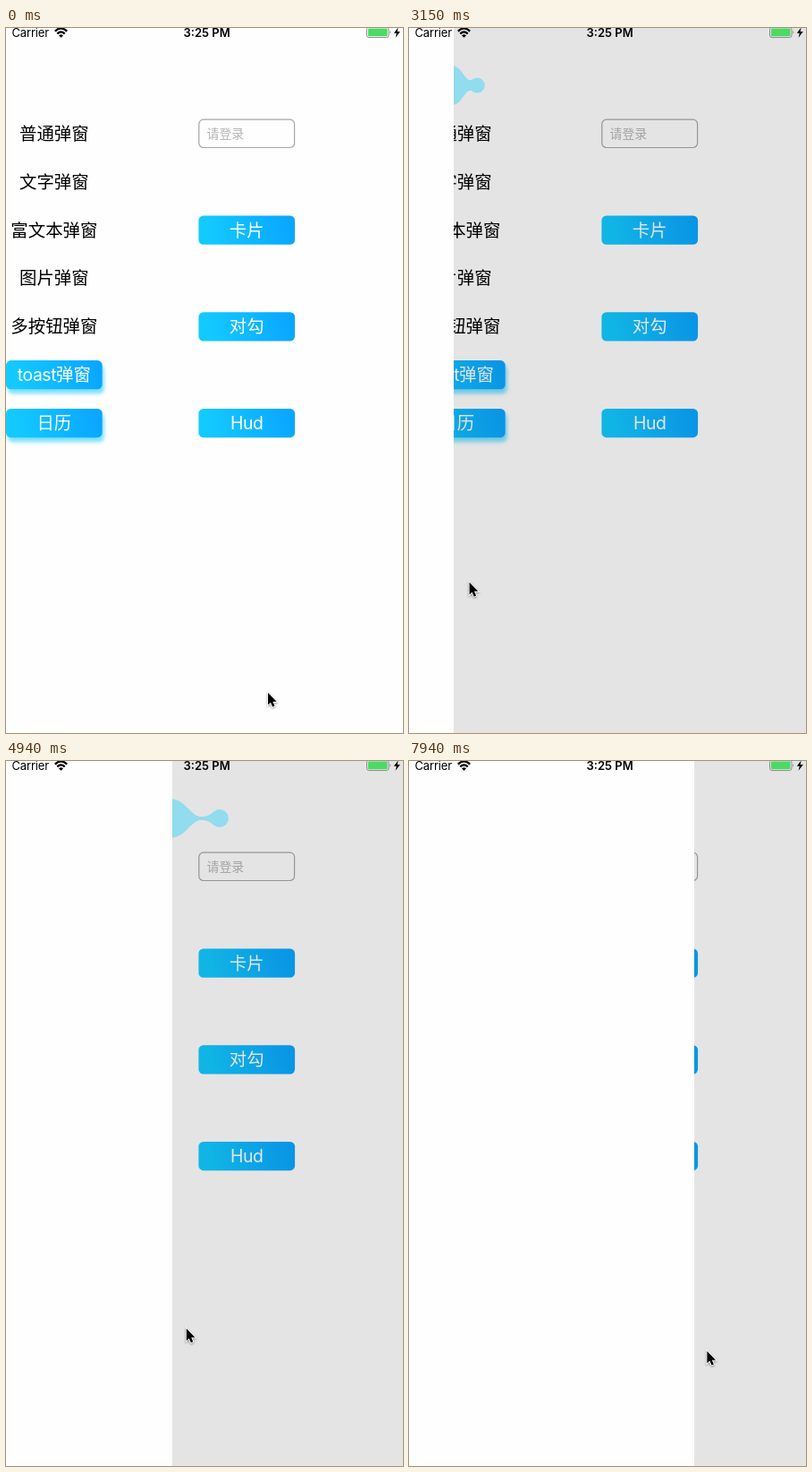
Animation of 444x787 px, one loop 8000 ms. Source, as an HTML page:

```html
<!DOCTYPE html>
<html lang="zh-CN">
<head>
<meta charset="utf-8">
<title>Drawer</title>
<style>
  html, body { margin: 0; width: 100%; height: 100%; overflow: hidden; background: #fefefe; }
  svg { display: block; width: 444px; height: 787px; }
  text { font: 400 19.4px Inter, "Noto Sans CJK SC", "Noto Sans CJK", sans-serif; text-anchor: middle; }
  .light { fill: #fefefe; }
  .latin { letter-spacing: -.45px; }
  .hint { font-size: 13.9px; fill: #b4b4b4; text-anchor: start; }
  .status { font-size: 13px; }
  .raised { filter: drop-shadow(2px 5px 2px rgba(18, 200, 255, .55)); }
  #cursor { filter: drop-shadow(0 1px 1px rgba(0, 0, 0, .4)); }
</style>
</head>
<body>
<svg viewBox="0 0 444 787">
  <defs>
    <linearGradient id="sky" gradientUnits="userSpaceOnUse" x1="0" y1="29" x2="108" y2="3">
      <stop offset=".1" stop-color="#13caff"/>
      <stop offset=".95" stop-color="#0aa6ff"/>
    </linearGradient>
  </defs>
  <rect width="444" height="787" fill="#fefefe"/>
  <g id="page">
    <rect x="215.8" y="102.2" width="106.8" height="31.3" rx="5" fill="none" stroke="#a6a6a6" stroke-width="1.2"/>
    <text class="hint" x="224.5" y="123">请登录</text>
  </g>
  <g id="drawer">
    <rect width="444" height="787" fill="#000" opacity=".1"/>
    <path id="blob" fill="#91dcee"/>
    <rect id="panel" height="787" fill="#fefefe"/>
  </g>
  <g id="bar">
    <text class="status" x="6.5" y="10" style="text-anchor:start;letter-spacing:-.15px">Carrier</text>
    <g fill="none" stroke="#000" stroke-width="2.3">
      <path d="M54.8 3.6Q61.5 -2.8 68.2 3.6"/>
      <path d="M57.3 6.4Q61.5 2.4 65.7 6.4"/>
    </g>
    <path d="M61.5 10.8L59 8.3Q61.5 6 64 8.3Z"/>
    <text class="status" x="224.6" y="10" style="font-weight:600">3:25 PM</text>
    <rect x="403.5" y="-1" width="24.5" height="11.6" rx="2.5" fill="none" stroke="#8d8d8d"/>
    <rect x="405" y=".6" width="21.5" height="8.6" rx="1" fill="#4cd964"/>
    <path d="M429.3 3Q431.4 4.8 429.3 6.8Z" fill="#8d8d8d"/>
    <path d="M438.6 -.6L433.8 5.8H436.8L435.6 10.8L440.8 4H437.6Z"/>
  </g>
  <path id="cursor" d="M0 0V13.6L3 10.9L5.1 15.8L7.5 14.8L5.4 10H9.7Z" stroke="#fff" stroke-width="1.8" paint-order="stroke"/>
</svg>
<script>
const $ = id => document.getElementById(id);
const LOOP = 8000, PULL = 2400, SPLIT = 5500;
const ROW = 53.85, BTN_W = 107.7, BTN_H = 32.3, RIGHT = 215.4;

const label = (text, x, row, cls = '') =>
  `<text class="${cls}" x="${x + BTN_W / 2}" y="${124.9 + row * ROW}">${text}</text>`;
const button = (text, x, row, raised) =>
  `<g transform="translate(${x} ${101.8 + row * ROW})"><rect class="${raised ? 'raised' : ''}"
    width="${BTN_W}" height="${BTN_H}" rx="5.4" fill="url(#sky)"/></g>` + label(text, x, row, 'light');
const latin = text => `<tspan class="latin">${text}</tspan>`;

$('page').innerHTML += ['普通弹窗', '文字弹窗', '富文本弹窗', '图片弹窗', '多按钮弹窗']
  .map((text, row) => label(text, 0, row)).join('')
  + button(latin('toast') + '弹窗', 0, 5, true) + button('日历', 0, 6, true)
  + button('卡片', RIGHT, 2) + button('对勾', RIGHT, 4) + button(latin('Hud'), RIGHT, 6);

// time, panel width
const pull = [[PULL, 0], [3150, 50], [3900, 115], [5090, 196], [5990, 243], [7190, 298], [7940, 319]];
// time, x, y of the pointer before it pulls the panel
const roam = [[0, 293, 742], [150, 281, 648], [300, 296, 650], [450, 296, 650],
  [1500, -7, 616], [1800, -20, 612], [2250, 15, 611.5], [PULL, 18, 613]];

function sample(keys, at) {
  const i = keys.findIndex(k => k[0] > at);
  if (i === 0) return keys[0].slice(1);
  if (i < 0) return keys[keys.length - 1].slice(1);
  const a = keys[i - 1], b = keys[i], p = (at - a[0]) / (b[0] - a[0]);
  return a.slice(1).map((v, j) => v + (b[j + 1] - v) * p);
}

// the pointer leads the panel edge and sinks faster near the end
const follow = edge => [edge + 18.2 - edge * .012, 613.5 + edge * .107 + 11 * (edge / 319) ** 8];

const circle = (x, y, r) => `M${x - r} ${y}a${r} ${r} 0 1 1 ${2 * r} 0a${r} ${r} 0 1 1 ${-2 * r} 0Z`;

// the drop runs ahead while its neck thins, then both parts are plain circles
function blobPath(edge, split) {
  const y = 64, r = Math.min(10, 8 + edge * .011);
  const cx = edge + 21 + edge * .08 + edge * edge * .0005;
  const drop = circle(cx, y, r);
  if (split) return circle(edge - 15.5, y, 26.5) + drop;

  const len = 14 + edge * .105, h = 9 * Math.exp(-edge / 110);
  const neck = edge + len, joint = cx - r * .6, mid = (neck + joint) / 2;
  const half = Math.max(r * .8, h);
  const c1 = edge + len * .48, c2 = edge + len * .62;
  return `M${edge} ${y - 21.8}C${c1} ${y - 20} ${c2} ${y - h} ${neck} ${y - h}`
    + `Q${mid} ${y - h} ${joint} ${y - half}V${y + half}Q${mid} ${y + h} ${neck} ${y + h}`
    + `C${c2} ${y + h} ${c1} ${y + 20} ${edge} ${y + 21.8}Z` + drop;
}

function draw(now) {
  // the screen refreshes every 150 ms, slightly early in the second half
  const time = now % LOOP, early = time >= 4940 ? 10 : 0;
  const t = Math.floor((time + early) / 150) * 150 - early;
  const [edge] = sample(pull, t);
  const [x, y] = t < PULL ? sample(roam, t) : follow(edge);
  $('drawer').style.display = edge > 0 ? '' : 'none';
  $('panel').setAttribute('width', edge);
  $('blob').setAttribute('d', blobPath(edge, t >= SPLIT));
  $('blob').setAttribute('opacity', Math.max(0, Math.min(1, 1 - (t - SPLIT) / 900)));
  $('cursor').setAttribute('transform', `translate(${x} ${y})`);
}

const start = performance.now();
function tick() {
  draw(performance.now() - start);
  requestAnimationFrame(tick);
}
tick();
</script>
</body>
</html>
```
